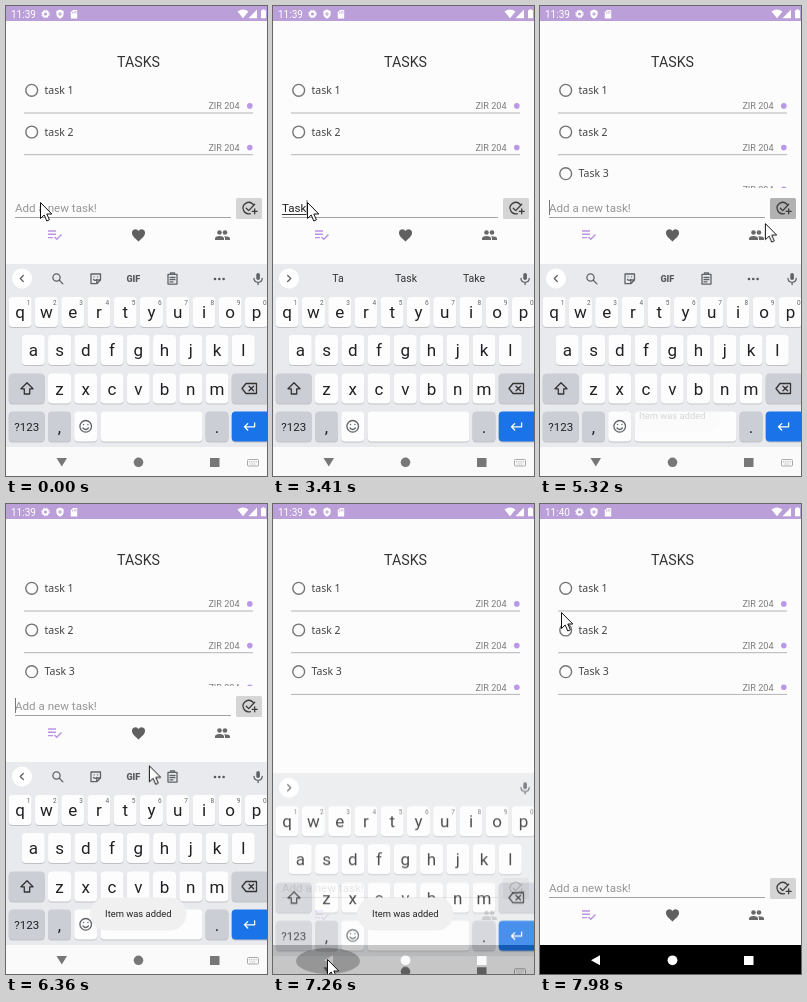
Write an HTML page that moves like this. It is 261 px wide and 470 px high and loops after 8000 ms.

```html
<!DOCTYPE html>
<html lang="en">
<head>
<meta charset="utf-8">
<title>Task list</title>
<style>
html, body { margin: 0; width: 100%; height: 100%; overflow: hidden; background: #fcfcfc; }
svg { display: block; width: 100vw; height: 100vh; font-family: Roboto, sans-serif; }
.line { fill: none; stroke: #5f6368; stroke-width: 1.3; stroke-linecap: round; stroke-linejoin: round; }
.mid { text-anchor: middle; }
.task { font: 10.5px "Noto Sans", sans-serif; fill: #444; }
.field { font-size: 11.6px; }

/* 1% of the loop is 80 ms */
.step { animation: 8s step-end infinite; }
.flow { animation: 8s linear infinite; }

.hint { animation-name: hint; }
@keyframes hint { 0% { opacity: 1 } 37.375% { opacity: 0 } 65.625%, 100% { opacity: 1 } }

.typed { animation-name: typed; }
@keyframes typed { 0% { opacity: 0 } 37.375% { opacity: 1 } 65.625%, 100% { opacity: 0 } }

.reveal { animation-name: reveal; }
@keyframes reveal {
  0% { width: 7.2px } 39.625% { width: 12.7px } 41.125% { width: 18.7px }
  42.625% { width: 24.7px } 50.75%, 100% { width: 40px }
}
.composing { animation-name: composing; }
@keyframes composing { 0% { opacity: 0 } 37.375% { opacity: 1 } 50.75%, 100% { opacity: 0 } }

.caret { animation-name: blink; }
@keyframes blink {
  0%, 10.875%, 21.25%, 35.875%, 57%, 72.125%, 84.375%, 100% { opacity: 0 }
  4.625%, 17.125%, 29.75%, 37.375%, 65.625%, 78% { opacity: 1 }
}
.advance { animation-name: advance; }
@keyframes advance {
  0% { transform: none } 37.375% { transform: translateX(7px) } 39.625% { transform: translateX(12.7px) }
  41.125% { transform: translateX(18.7px) } 42.625% { transform: translateX(24.5px) }
  48% { transform: translateX(27.4px) } 50.75% { transform: translateX(34px) } 65.625%, 100% { transform: none }
}
.tools { animation-name: tools; }
@keyframes tools { 0%, 54.5% { opacity: 1 } 40.375%, 89.25%, 100% { opacity: 0 } }
.closed { animation-name: closed; }
@keyframes closed { 0%, 54.5% { opacity: 0 } 40.375%, 89.25%, 100% { opacity: 1 } }
.words1 { animation-name: words1; }
@keyframes words1 { 0% { opacity: 0 } 40.375% { opacity: 1 } 46.125%, 100% { opacity: 0 } }
.words2 { animation-name: words2; }
@keyframes words2 { 0% { opacity: 0 } 46.125% { opacity: 1 } 54.5%, 100% { opacity: 0 } }

.added { animation-name: added; }
@keyframes added { 0% { opacity: 0 } 65.625%, 100% { opacity: 1 } }
.listClip { animation-name: listClip; }
@keyframes listClip { 0% { height: 122px } 89.25%, 100% { height: 200px } }
.footer { animation-name: footer; }
@keyframes footer { 0% { transform: none } 89.25%, 100% { transform: translateY(182px) } }
.old { animation-name: old; }
@keyframes old { 0% { opacity: 1 } 94%, 100% { opacity: 0 } }
.new { animation-name: new; }
@keyframes new { 0% { opacity: 0 } 94%, 100% { opacity: 1 } }

.button { animation-name: press; }
@keyframes press { 0%, 64.2% { fill: #d5d5d5 } 65.5%, 66.6% { fill: #b2b2b2 } 69%, 100% { fill: #d5d5d5 } }
.keyboard { animation-name: hide; }
@keyframes hide {
  0%, 89.25% { transform: none; opacity: 1 }
  90.75% { transform: translateY(11px); opacity: .8 }
  93%, 100% { transform: translateY(48px); opacity: 0 }
}
.ripple { animation-name: ripple; }
@keyframes ripple { 0%, 87.5% { opacity: 0 } 89%, 91% { opacity: .24 } 93.5%, 100% { opacity: 0 } }
.toast { animation-name: toast; }
@keyframes toast { 0%, 66.2% { opacity: 0 } 68%, 92.5% { opacity: 1 } 94.5%, 100% { opacity: 0 } }

.mouse { animation-name: mouse; }
@keyframes mouse {
  0%, 57.1% { transform: translate(34px, 196px) }
  57.125% { transform: translate(45px, 201px) }
  63.5%, 65% { transform: translate(236px, 204px) }
  66.5% { transform: translate(225px, 217px) }
  72.125%, 77.5% { transform: translate(158px, 246px) }
  79.5% { transform: translate(143px, 261px) }
  87%, 91% { transform: translate(54px, 455px) }
  98.25% { transform: translate(25px, 124px) }
  99.75%, 100% { transform: translate(21px, 108px) }
}
</style>
</head>
<body>
<svg viewBox="0 0 261 470" preserveAspectRatio="none">
  <defs>
    <clipPath id="listArea"><rect class="step listClip" y="60" width="261" height="122"/></clipPath>
    <clipPath id="typedArea"><rect class="step reveal" x="9" y="190" width="7" height="21"/></clipPath>
  </defs>
  <rect width="261" height="470" fill="#fcfcfc"/>

  <g id="status" fill="#fff">
    <rect width="261" height="15" fill="#bb9fd8"/>
    <g font-size="10">
      <text class="step old" x="5" y="11.5">11:39</text>
      <text class="step new" x="5" y="11.5">11:40</text>
    </g>
    <circle cx="39.5" cy="8" r="2.5" fill="none" stroke="#fff" stroke-width="1.8"/>
    <circle cx="39.5" cy="8" r="3.8" fill="none" stroke="#fff" stroke-dasharray="1.6 1.38"/>
    <path d="M54 3.5l3.6 1.4v3q0 3-3.6 4.8q-3.6-1.8-3.6-4.8v-3z"/>
    <path d="M54 6v4M52 8h4" stroke="#bb9fd8"/>
    <path d="M67 4h4.2v8.5h-6.4v-6.3z"/>
    <path d="M66.5 5.8v1.8M68.2 5v2.6M69.9 5v2.6" stroke="#bb9fd8" stroke-width=".7"/>
    <path d="M231.5 5.5q5.5-4 11 0l-5.5 6.8zM251 3.5v8.7h-8.5zM255 4.3h1.5v-1h2v1h1.5v8h-5z"/>
  </g>

  <text class="mid" x="132.5" y="61" font-size="14.2" fill="#333">TASKS</text>
  <g id="list" clip-path="url(#listArea)"></g>

  <g class="step footer">
    <text class="step hint field" x="9" y="206" fill="#969696">Add a new task!</text>
    <g class="step typed">
      <g clip-path="url(#typedArea)">
        <text class="field" x="9" y="206" fill="#222">Task 3</text>
        <rect class="step composing" x="9" y="208" width="24.5" height="1" fill="#333"/>
      </g>
    </g>
    <g class="step advance"><rect class="step caret" x="9" y="194" width="1" height="15" fill="#777"/></g>
    <path d="M9 211.5H225" stroke="#a2a2a2"/>
    <rect class="flow button" x="230" y="192" width="26" height="21" rx="1.5" fill="#d5d5d5"/>
    <path class="line" style="stroke:#3c3c3c" d="M247 198.3a5.7 5.7 0 1 0-2.6 9.3M240.3 202.2l2.4 2.4l6-6.3M248.7 202.8v5M246.2 205.3h5"/>
    <path d="M42 225h8M42 228.3h8M42 231.6h5M48.5 231l2.3 2.3l4.7-4.9" fill="none" stroke="#b994e4" stroke-width="1.4"/>
    <path d="M132.5 235.5C128 231.5 126 229.6 126 227.1A3.5 3.5 0 0 1 132.5 225A3.5 3.5 0 0 1 139 227.1C139 229.6 137 231.5 132.5 235.5Z" fill="#606060"/>
    <g fill="#686868">
      <circle cx="213.5" cy="226.5" r="2.3"/><circle cx="219" cy="226.5" r="2.3"/>
      <path d="M209 234v-1.5q0-2.2 4.5-2.4q4.5.2 4.5 2.4v1.5zM219 234v-1.5q0-1.4-1-2.3q6 0 6 2.3v1.5z"/>
    </g>
  </g>

  <rect y="441" width="261" height="29" fill="#000"/>
  <g fill="#fff"><path d="M60 451.3v10l-9-5z"/><circle cx="132.5" cy="456.3" r="4.9"/><rect x="204" y="452" width="9.5" height="9"/></g>

  <g class="flow keyboard">
    <rect y="258" width="261" height="183" fill="#e8eaed"/>
    <rect y="441" width="261" height="29" fill="#fafafa"/>
    <g fill="#777"><path d="M50.5 452h10.5l-5.2 8.6z"/><circle cx="132.5" cy="456.3" r="4.8"/><rect x="204" y="452" width="9.5" height="9"/></g>
    <rect x="241.5" y="453.5" width="11" height="6.5" rx="1" fill="none" stroke="#aaa"/>
    <path d="M243 455.8h8M244.5 458h5" stroke="#aaa" stroke-dasharray="1 .8"/>

    <circle cx="16" cy="272.5" r="10" fill="#fff"/>
    <path class="line step tools" d="M17.3 269.5l-3 3l3 3"/>
    <path class="line step closed" d="M14.7 269.5l3 3l-3 3"/>
    <g class="step tools">
      <circle class="line" cx="50.5" cy="271.5" r="3.6"/><path class="line" d="M53.3 274.3l3.6 3.6"/>
      <path class="line" d="M85 268h9.5v6l-3.7 3.7h-5.8zM94.5 274h-3.7v3.7M87.5 273.5q1.5 1.8 3.2 0M88 270.8h.1M91.5 270.8h.1"/>
      <text class="mid" x="127.3" y="276" font-size="9" font-weight="900" fill="#55585d">GIF</text>
      <path class="line" d="M162 268.3h9v9.8h-9zM164.5 268v-1.2h4v1.2M164 271.5h5M164 273.7h5M164 275.8h3"/>
      <g fill="#55585d"><circle cx="209" cy="273" r="1.3"/><circle cx="213.3" cy="273" r="1.3"/><circle cx="217.6" cy="273" r="1.3"/></g>
    </g>
    <g id="words" class="mid" font-size="10.5" fill="#333"></g>
    <rect x="250.3" y="267" width="3.6" height="7" rx="1.8" fill="#5f6368"/>
    <path class="line" d="M248 272.3q0 4 4.1 4q4.1 0 4.1-4M252.1 276.5v2"/>

    <g id="keys"></g>
    <path class="line" style="stroke:#333" d="M21 376.8l6 6h-3.3v5.2h-5.4v-5.2h-3.3zM240 377.5h10.5v10H240l-4-5zM243 380.2l4.6 4.6M247.6 380.2l-4.6 4.6"/>
    <circle class="line" cx="79.7" cy="420.3" r="5.8"/>
    <path class="line" d="M77.5 418.5h.1M81.9 418.5h.1M77 422q2.7 3 5.4 0"/>
    <path class="line" style="stroke:#fff" d="M248.6 416.8v4H238.5M241.7 417.6l-3.2 3.2l3.2 3.2"/>
  </g>
  <ellipse class="flow ripple" cx="55" cy="457" rx="32" ry="13" fill="#000"/>

  <g class="flow toast">
    <rect x="84" y="393.5" width="96.5" height="33" rx="16.5" fill="#f0f0f0"/>
    <text class="mid" x="132.3" y="413.3" font-size="9.4" fill="#222">Item was added</text>
  </g>
  <path class="flow mouse" d="M.5.5V16.5L4.2 13L6.8 19L9.4 17.8L6.8 12H11.8Z" fill="#fff" stroke="#111"/>
</svg>
<script>
const fill = (id, html) => { document.getElementById(id).innerHTML = html; };

const row = (name, i) => {
  const y = 84.3 + i * 41.7;
  return `<g class="${i === 2 ? 'step added' : ''}">
    <circle cx="25.7" cy="${y}" r="5.9" fill="none" stroke="#757575" stroke-width="1.4"/>
    <text class="task" x="38.5" y="${y + 3.7}">${name}</text>
    <text x="233.5" y="${y + 18.8}" font-size="9.1" text-anchor="end" fill="#7c7c7c">ZIR 204</text>
    <circle cx="243.8" cy="${y + 15.6}" r="2.8" fill="#ba98e8"/>
    <path d="M18 ${y + 22.7}H247" stroke="#b4b4b4"/></g>`;
};
fill('list', ['task 1', 'task 2', 'Task 3'].map(row).join(''));

const suggestions = [['Ta', 'Task', 'Take'], ['Task', 'Tasks', 'Tasked']];
fill('words', suggestions.map((set, n) => `<g class="step words${n + 1}">` +
  set.map((word, i) => `<text x="${65 + i * 68}" y="276">${word}</text>`).join('') + '</g>').join(''));

const GREY = '#ccced5', WHITE = '#fdfdfd', BLUE = '#1a73e8', PITCH = 26.25;
const key = (x, y, w, color, label = '', size = 17, dy = 21) =>
  `<rect x="${x}" y="${y + 1}" width="${w}" height="30" rx="4" fill="#bfc1c6"/>
   <rect x="${x}" y="${y}" width="${w}" height="30" rx="4" fill="${color}"/>
   <text class="mid" x="${x + w / 2}" y="${y + dy}" font-size="${size}" fill="#202124">${label}</text>`;
const letters = (text, x, y) =>
  [...text].map((c, i) => key(x + i * PITCH, y, 23, WHITE, c)).join('');
const digits = [...'1234567890'].map((d, i) =>
  `<text class="mid" x="${22.5 + i * PITCH}" y="299" font-size="6.5" fill="#666">${d}</text>`).join('');

fill('keys', letters('qwertyuiop', 2.7, 291) + digits +
  letters('asdfghjkl', 15.8, 329) +
  key(2.7, 367.5, 36, GREY) + letters('zxcvbnm', 42, 367.5) + key(225.7, 367.5, 38, GREY) +
  key(2.7, 405.5, 36, GREY, '?123', 11.5, 19) + key(42, 405.5, 23, GREY, ',') +
  key(68.2, 405.5, 23, WHITE) + key(94.5, 405.5, 102, WHITE) +
  key(199.5, 405.5, 23, GREY, '.') + key(225.7, 405.5, 38, BLUE));
</script>
</body>
</html>
```
